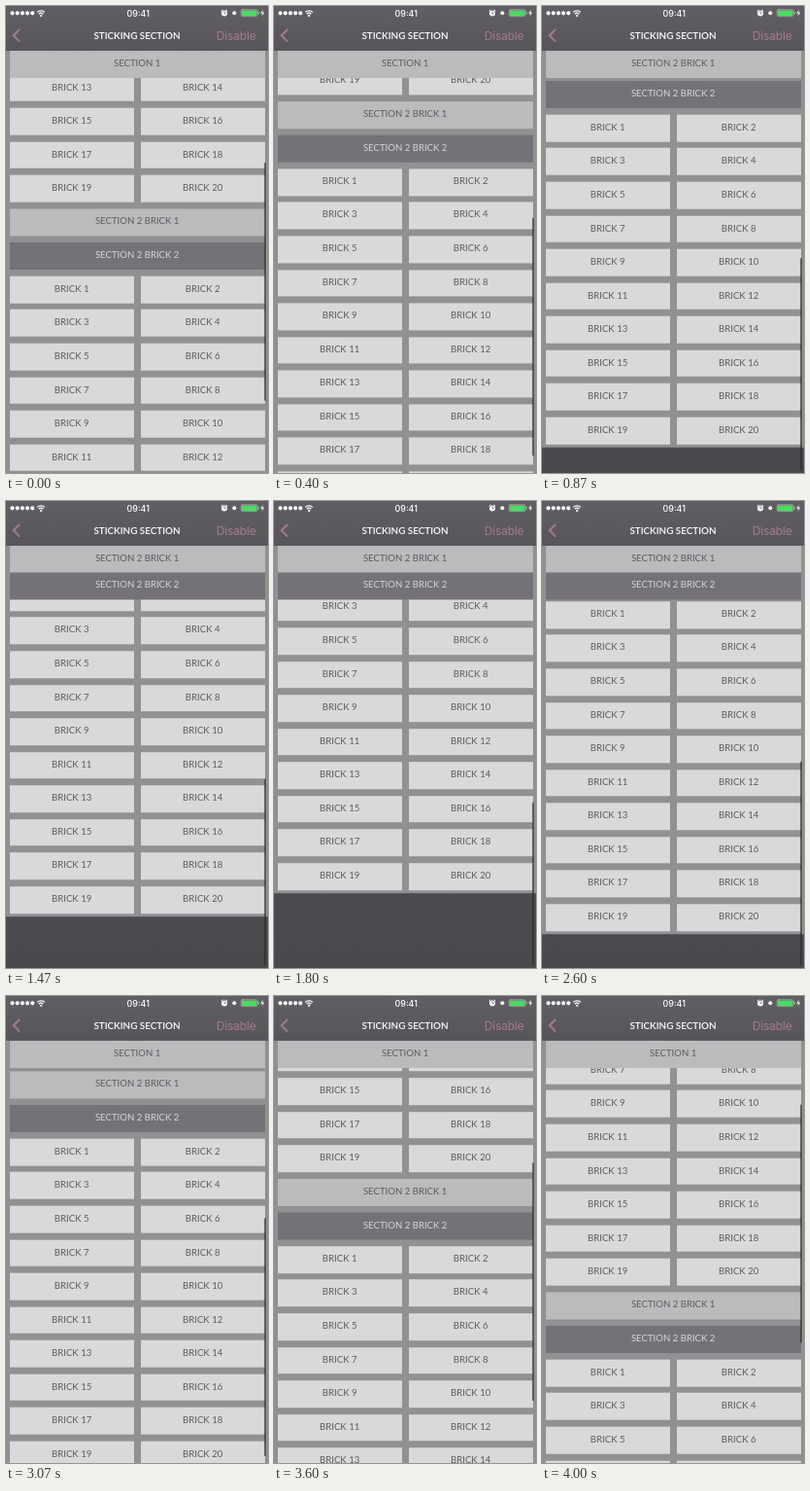
Write an HTML page that moves like this. It is 270 by 480 pixels and loops after 4070 ms.

```html
<!DOCTYPE html>
<html lang="en">
<head>
<meta charset="utf-8">
<title>Sticking section</title>
<style>
  html, body { margin: 0; width: 100%; height: 100%; overflow: hidden; background: #4d4b4f; }
  #stage {
    position: relative; width: 270px; height: 480px; overflow: hidden;
    background: linear-gradient(#545256, #4f4d51 75%, #4a484c);
  }
  #stage div { position: absolute; box-sizing: border-box; }
  #list { left: 0; top: 0; width: 270px; height: 795.4px; background: #919092; }
  .brick {
    left: 3.5px; top: 0; width: 263.3px; height: 27.7px;
    font: 400 9.6px/26px Lato, sans-serif; text-align: center;
    color: #5e5b5f; background: #d9d8da; white-space: nowrap;
  }
  .half { width: 128.4px; }
  .right { left: 138.5px; }
  .mid { background: #bcbabd; }
  .dark { background: #757277; color: #d6d4d7; }
  #thumb { left: 265.9px; top: 0; width: 1.9px; border-radius: 1px; background: rgba(40, 38, 40, .6); }
  #nav { left: 0; top: 0; width: 270px; height: 46.08px; background: linear-gradient(#625f64, #58555a); }
  #nav svg { position: absolute; left: 0; top: 0; }
  #nav div { white-space: nowrap; }
  #clock { left: 0; width: 272.5px; top: 1.6px; text-align: center; color: #fff; font: 500 8.9px/12px Inter, sans-serif; }
  #title { left: 0; width: 270px; top: 23px; text-align: center; color: #fff; font: 600 9.9px/14px Lato, sans-serif; }
  #action { right: 12.4px; top: 22.6px; color: #a07c90; font: 400 12px/16px Inter, sans-serif; letter-spacing: -.15px; }
</style>
</head>
<body>
<div id="stage">
  <div id="list"></div>
  <div id="sec1" class="brick mid">SECTION 1</div>
  <div id="head1" class="brick mid">SECTION 2 BRICK 1</div>
  <div id="head2" class="brick dark">SECTION 2 BRICK 2</div>
  <div id="thumb"></div>
  <div id="nav">
    <svg width="270" height="46" fill="none" stroke-linecap="round">
      <path d="M6.5 7.3H28" stroke="#fff" stroke-width="4.2" stroke-dasharray="0 5.2"/>
      <g stroke="#fff" stroke-width="1.3" stroke-linecap="butt">
        <path d="M32.2 6.4a5.6 5.6 0 0 1 7.8 0M33.8 8.2a3.3 3.3 0 0 1 4.6 0"/>
        <circle cx="36.1" cy="9.9" r=".5"/>
      </g>
      <circle cx="225" cy="7.6" r="3" fill="#fff"/>
      <path d="M222 5l1-1M228 5l-1-1" stroke="#fff"/>
      <path d="M225 6v1.7h1.3" stroke="#625f64" stroke-width=".8"/>
      <circle cx="235.3" cy="7.3" r="2" fill="#fff"/>
      <rect x="242.3" y="3.8" width="16.6" height="6.8" rx="1.3" stroke="#b9cdbb" stroke-width=".6"/>
      <rect x="243" y="4.5" width="15.2" height="5.4" rx=".7" fill="#4cd964"/>
      <path d="M260 6v2.4" stroke="#b9cdbb" stroke-width="1"/>
      <path d="M265 3.8l-2.8 3.8h2l-.8 3 2.8-3.9h-2z" fill="#fff"/>
      <path d="M14 24l-6.3 6.3 6.3 6.3" stroke="#a07c90" stroke-width="2" stroke-linecap="butt"/>
    </svg>
    <div id="clock">09:41</div>
    <div id="title">STICKING SECTION</div>
    <div id="action">Disable</div>
  </div>
</div>
<script>
  const LOOP = 4070, STEP = 1000 / 15;
  const PITCH = 34.56, BRICK = 27.36, PAD = 3.6, NAV = 46.08;
  const LIST = 794.6, FLOOR = 480, PULLED = 381;

  // [time, y of the list's lower edge]
  const keys = [
    [0, 619.3], [133, 588], [267, 549], [400, 509], [533, 475], [600, 475],
    [867, 453.3], [1133, 442], [1467, 426.8], [1667, 410], [2133, 384.7],
    [2200, 383], [2333, PULLED], [2400, PULLED], [3000, FLOOR], [3067, 488.3],
    [3333, 539], [3600, 598.8], [3800, 655], [4000, 715.3]
  ];

  const el = id => document.getElementById(id);
  const [list, sec1, head1, head2, thumb] = ['list', 'sec1', 'head1', 'head2', 'thumb'].map(el);
  const rowTop = i => PAD + PITCH * i;
  const place = (node, y) => { node.style.transform = `translateY(${y.toFixed(2)}px)`; };

  function addBricks(firstRow) {
    for (let n = 0; n < 20; n++) {
      const brick = document.createElement('div');
      brick.className = 'brick half' + (n % 2 ? ' right' : '');
      brick.textContent = 'BRICK ' + (n + 1);
      brick.style.top = rowTop(firstRow + (n >> 1)) + 'px';
      list.append(brick);
    }
  }

  function edgeAt(t) {
    if (t > 2400 && t < 2990) { // release from overscroll: damped spring
      const d = 11 * (t - 2400) / 1000;
      return FLOOR - (FLOOR - PULLED) * (1 + d) * Math.exp(-d);
    }
    const i = keys.findIndex(k => k[0] >= t);
    if (i < 0) return keys[keys.length - 1][1];
    if (i === 0) return keys[0][1];
    const [t0, y0] = keys[i - 1], [t1, y1] = keys[i];
    return y0 + (y1 - y0) * (t - t0) / (t1 - t0);
  }

  function draw() {
    const time = performance.now() % LOOP;
    const edge = edgeAt(Math.floor((time + 4) / STEP) * STEP);
    const top = edge - LIST;
    const first = top + rowTop(11);

    place(list, top);
    place(sec1, Math.min(NAV, first - BRICK));
    place(head1, Math.max(NAV, first));
    place(head2, Math.max(NAV + BRICK, first + PITCH));

    const over = Math.max(0, FLOOR - edge);
    const length = 245 - over;
    const bottom = 477.3 - Math.max(0, edge - FLOOR) * .513;
    thumb.style.height = length.toFixed(2) + 'px';
    place(thumb, bottom - length);
    requestAnimationFrame(draw);
  }

  addBricks(1);
  addBricks(13);
  draw();
</script>
</body>
</html>
```
